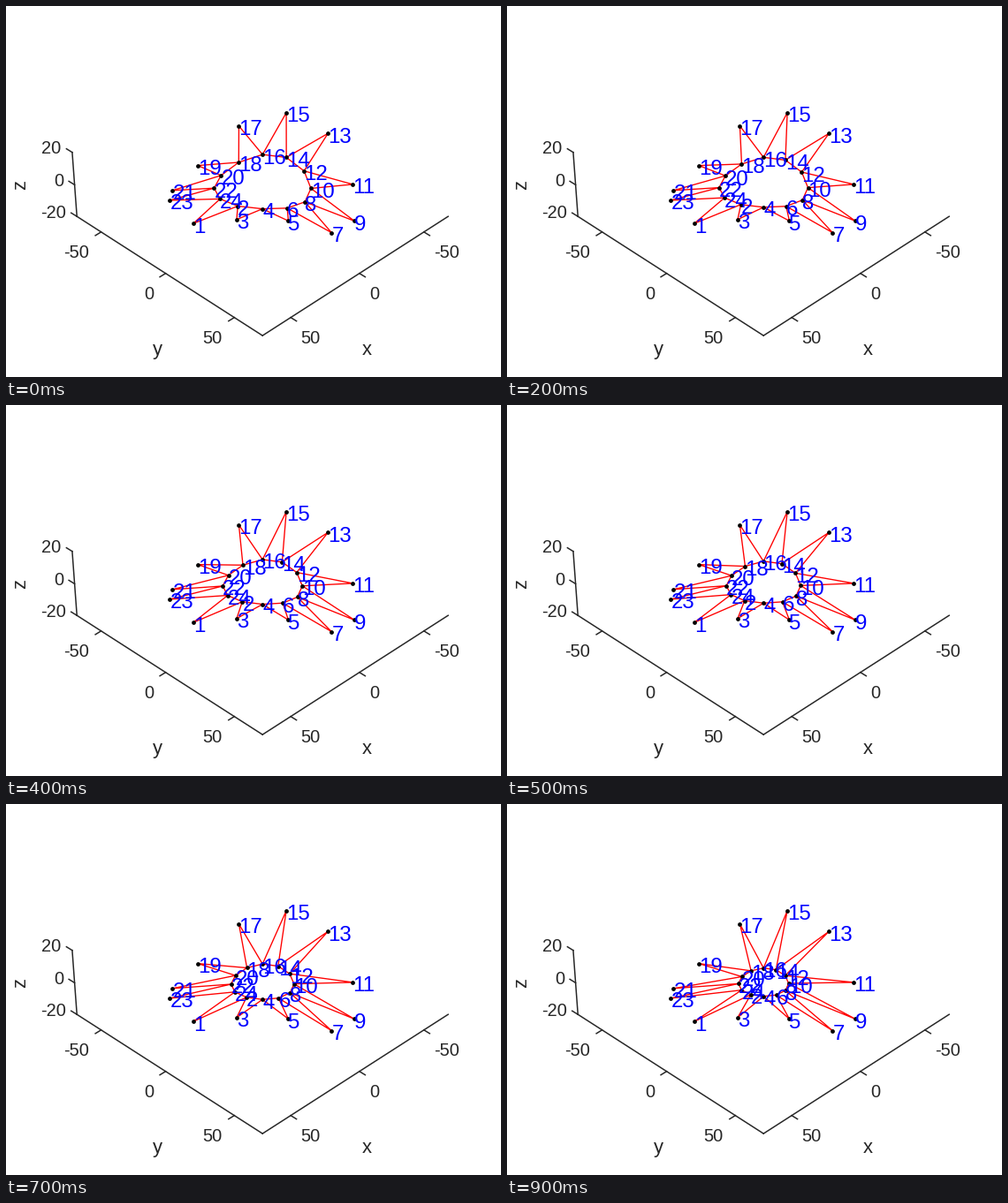
Animation of 560 by 420 pixels, one loop 1 s. Source, as a matplotlib script:

```python
import matplotlib.pyplot as plt
import numpy as np
from matplotlib.animation import FuncAnimation

W, H, DPI = 560, 420, 100
PX = 72 / DPI
GRAY = "#262626"
plt.rcParams["font.family"] = "Liberation Sans"

# Perspective camera
ORIGIN = 289.7, 201.9
ZOOM, DISTANCE, ELEVATION = 2.16, 940, np.radians(35)
Z_STRETCH = 1.025

EDGE, TOP = 69.6, 20        # half size of the axes box
POINTS = 24
TIP_RADIUS, RING_RADIUS = 49.7, 25.4
# Waves around the rim of the surface: count, height, phase in degrees
WAVES = [(1, 1, 53), (2, 13, 210), (3, 3.7, 180), (4, 2.1, -32), (5, 1.7, 123)]

fig = plt.figure(figsize=(W / DPI, H / DPI), dpi=DPI, facecolor="white")
ax = fig.add_axes([0, 0, 1, 1])
ax.set(xlim=(-0.5, W - 0.5), ylim=(H - 0.5, -0.5))
ax.axis("off")


def project(x, y, z):
    """Turn a position in the plot's space into pixels."""
    side, front, up = (y - x) / np.sqrt(2), (x + y) / np.sqrt(2), z * Z_STRETCH
    sin, cos = np.sin(ELEVATION), np.cos(ELEVATION)
    scale = ZOOM / (1 - (front * cos + up * sin) / DISTANCE)
    return np.array([ORIGIN[0] + scale * side,
                     ORIGIN[1] + scale * (front * sin - up * cos)])


def line(xy, color=GRAY, width=1.5, **style):
    return ax.plot(*xy, color=color, lw=width * PX, **style)[0]


def label(x, y, text, size=20, color=GRAY, **style):
    style.setdefault("va", "baseline")
    return ax.text(x, y, text, fontsize=size * PX, color=color, **style)


def draw_axis(name, place, limit, step, tick, offset, align, name_offset, **style):
    """Draw one axis; place maps a value on it to a position in space."""
    line(np.transpose([project(*place(v)) for v in (-limit, limit)]))
    for value in (-step, 0, step):
        x, y = project(*place(value))
        line([(x, x + tick[0]), (y, y + tick[1])])
        label(x + offset[0], y + offset[1], str(value), ha=align)
    x, y = project(*place(0)) + name_offset
    label(x, y, name, 22, ha="center", **style)


def surface_height(radius, angle):
    return sum(height * (radius / TIP_RADIUS) ** (1.2 * n)
               * np.cos(n * angle - np.radians(phase))
               for n, height, phase in WAVES)


def star(frame):
    """Points alternate between fixed tips and a ring that shrinks ever faster."""
    ring = RING_RADIUS * (1 - 0.0375 * frame - 0.00178 * frame ** 2)
    number = np.arange(1, POINTS + 1)
    angle = np.radians(150) - number * 2 * np.pi / POINTS
    radius = np.where(number % 2, TIP_RADIUS, ring)
    turned = angle - np.pi / 4
    return project(radius * np.sin(turned), radius * np.cos(turned),
                   surface_height(radius, angle))


def closed(xy):
    return np.hstack([xy, xy[:, :1]])


draw_axis("x", lambda v: (v, EDGE, -TOP), EDGE, 50,
          (6.5, 4), (11.5, 29), "left", (8, 92.5))
draw_axis("y", lambda v: (EDGE, v, -TOP), EDGE, 50,
          (-6.5, 4), (-13.5, 29), "right", (-9.5, 92.5))
draw_axis("z", lambda v: (EDGE, -EDGE, v), TOP, TOP,
          (-6.5, -4), (-12.5, 1.5), "right", (-60.5, 0),
          va="center", rotation=90)

zigzag = line(closed(star(0)), "red", 1.35, zorder=3)
ring_line = line(closed(star(0)[:, 1::2]), "red", 1.35, zorder=3)
dots, = ax.plot(*star(0), "o", color="black", ms=4.8 * PX, mew=0, zorder=4)
numbers = [label(0, 0, str(i + 1), 24, "blue", zorder=5) for i in range(POINTS)]


def update(frame):
    xy = star(frame)
    zigzag.set_data(*closed(xy))
    ring_line.set_data(*closed(xy[:, 1::2]))
    dots.set_data(*xy)
    for text, (x, y) in zip(numbers, xy.T):
        text.set_position((x, y + 10.5))
    return [zigzag, ring_line, dots, *numbers]


anim = FuncAnimation(fig, update, frames=10, interval=100, repeat=True)
plt.show()
```
